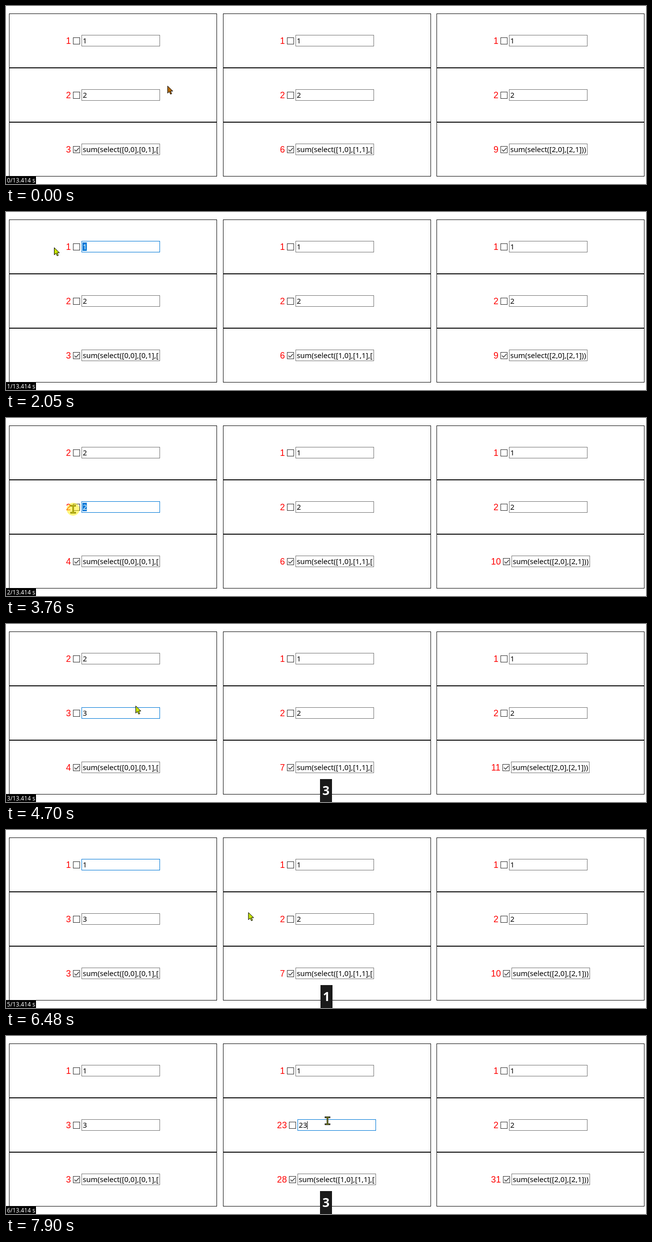
An HTML page that plays this animation: 1280 px wide and 357 px high, repeating every 8 s.

```html
<!DOCTYPE html>
<html lang="en">
<head>
<meta charset="utf-8">
<title>Linked cells</title>
<style>
  html, body { margin: 0; width: 100%; height: 100%; overflow: hidden; background: #fff; }
  svg { display: block; width: 100%; height: 100%; }
  text { white-space: pre; }
  .result { font: 17.6px "Liberation Sans", sans-serif; fill: #f00; text-anchor: end; }
  .input { font: 14.67px "Noto Sans", sans-serif; }
  .clock { font: 11.7px "Noto Sans", sans-serif; fill: #fff; }
  .key { font: bold 25px "Noto Sans", sans-serif; fill: #fff; text-anchor: middle; }
</style>
</head>
<body>
<svg id="stage" viewBox="0 0 1280 357"></svg>
<script>
const LOOP = 8000, SECOND = 1286, KEY_LIFE = 1300;
const COLUMN = 427.5, ROW = 109, DIGIT = 8.39;
const stage = document.getElementById("stage");

// Each edit: press in a field, drag over its text, release, then type keys.
const edits = [
  { col: 0, row: 0, down: 1200, up: 1620, keys: [[2350, "2"]] },
  { col: 0, row: 1, down: 3540, up: 3920, keys: [[4100, "3"]] },
  { col: 0, row: 0, down: 5240, up: 5760, keys: [[5800, "1"]] },
  { col: 1, row: 1, down: 6860, up: 7270, keys: [[7500, "2"], [7740, "3"]] }
];
const keyPresses = edits.flatMap(edit => edit.keys);

// Pointer path: time, x, y
const path = [
  [0, 323, 160], [250, 245, 150], [450, 207, 128], [620, 196, 90], [820, 178, 69],
  [1200, 178, 69], [1600, 96, 71], [2100, 96, 71], [2350, 130, 80], [2600, 200, 92],
  [2830, 238, 97], [3150, 245, 140], [3400, 235, 178], [3540, 235, 179], [3880, 80, 185],
  [4120, 80, 185], [4330, 155, 185], [4700, 259, 164], [4900, 258, 130], [5120, 230, 86],
  [5240, 200, 70], [5600, 96, 71], [5900, 96, 71], [6180, 290, 130], [6480, 484, 165],
  [6770, 600, 180], [6860, 600, 180], [7250, 470, 184], [7450, 470, 184], [7880, 643, 170]
];

function pointerAt(t) {
  const next = path.findIndex(p => p[0] > t);
  if (next < 0) return path[path.length - 1].slice(1);
  const [t0, x0, y0] = path[next - 1], [t1, x1, y1] = path[next];
  const k = (t - t0) / (t1 - t0);
  return [x0 + (x1 - x0) * k, y0 + (y1 - y0) * k];
}

const rect = (x, y, w, h, attrs) =>
  `<rect x="${x}" y="${y}" width="${w}" height="${h}" ${attrs}/>`;
const label = (x, y, kind, content, attrs = "") =>
  `<text x="${x}" y="${y}" class="${kind}" ${attrs}>${content}</text>`;
const outline = color => `fill="none" stroke="${color}"`;

function valuesAt(t) {
  const values = [["1", "1", "1"], ["2", "2", "2"]];
  for (const { row, col, keys } of edits) {
    const typed = keys.filter(([time]) => time <= t).map(([, key]) => key).join("");
    if (typed) values[row][col] = typed;
  }
  return values;
}

const formulas = ["sum(select([0,0],[0,1],[", "sum(select([1,0],[1,1],[", "sum(select([2,0],[2,1]))"];

// The content of a cell is centred, so a longer result moves it aside.
function contentShift(col, result) {
  const extra = result.length < 2 ? 0 : result === "11" ? 8.5 : 9.79;
  return Math.round(COLUMN * col + extra / 2);
}

function cell(t, col, row, result, content, edit, [px, py]) {
  const shift = contentShift(col, result), top = row * ROW;
  const x = px - shift, y = py - top;
  const hover = x > 151 && x < 308 && y > 58 && y < 81;
  const focused = edit && edit.col === col && edit.row === row;
  let selection = "", caret = "", ink = "#000";
  if (focused) {
    const typed = edit.keys.filter(([time]) => time <= t).pop();
    if (typed) {
      if ((t - typed[0]) % 800 < 400)
        caret = rect(153.5 + DIGIT * content.length, 62, 1, 16, "");
    } else if (x < 155) {
      selection = rect(153, 61, 8.6, 17, 'fill="#0078d7"');
      ink = "#fff";
    }
  }
  const border = focused ? "#0078d7" : hover ? "#000" : "#767676";
  const check = row === 2
    ? `<path d="M137 70l3 3.2 6-6.5" ${outline("#333")} stroke-width="1.3"/>` : "";
  const html = rect(Math.round(COLUMN * col) + 6.5, top + 15.5, 415, 108, outline("#111")) +
    `<g transform="translate(${shift} ${top})">` +
    label(129.7, 76, "result", result) +
    rect(134.5, 63.5, 13, 13, outline("#333")) + check +
    rect(151.5, 58.5, 156, 22, outline(border)) + selection +
    label(153.5, 75.3, "input", content, `fill="${ink}"`) + caret + "</g>";
  return { html, hover };
}

function cursor(t, [x, y], overText, pressed) {
  const bar = "M-4-7H4M0-7V7M-4 7H4";
  const warm = Math.max(0, 1 - t / 300);
  const arrowFill = `rgb(${200 - 20 * warm},${230 - 125 * warm},0)`;
  const shape = overText || pressed
    ? `<path d="${bar}" stroke="#000" stroke-width="3" stroke-linecap="square"/>
       <path d="${bar}" stroke="#98a61c" stroke-width="1.2"/>`
    : `<path d="M.5.5V15L4 11.8 6.3 17 8.7 16 6.4 10.8H11Z" fill="${arrowFill}" stroke="#000"/>`;
  const halo = pressed ? '<circle r="13" fill="#fff000" opacity=".5"/>' : "";
  return `<g transform="translate(${x} ${y})">${shape}${halo}</g>`;
}

function keyDisplay(t) {
  const press = keyPresses.filter(([time]) => time <= t).pop();
  if (!press || t - press[0] > KEY_LIFE) return "";
  const age = t - press[0];
  const opacity = Math.min(1, age / 80, (KEY_LIFE - age) / 80);
  const left = press[1] === "3" ? 628 : 629;
  return `<g opacity="${opacity}">` + rect(left, 311, 24, 46, 'fill="#1a1a1a"') +
    label(left + 12, 343, "key", press[1]) + "</g>";
}

function draw(t) {
  const pointer = pointerAt(t);
  const edit = edits.filter(e => e.down <= t).pop();
  const pressed = edit && t < edit.up;
  const values = valuesAt(t);
  const sums = values.map(row => row.reduce((sum, v) => sum + Number(v), 0));
  const totals = [...sums, sums[0] + sums[1]].map(String);

  let html = "", overText = false;
  for (let row = 0; row < 3; row++) {
    for (let col = 0; col < 3; col++) {
      const result = row < 2 ? values[row][col] : totals[col];
      const content = row < 2 ? result : formulas[col];
      const drawn = cell(t, col, row, result, content, edit, pointer);
      html += drawn.html;
      overText = overText || drawn.hover;
    }
  }
  html += rect(0, 341, 60, 16, "") +
    label(2, 353.5, "clock", `${Math.floor(t / SECOND)}/13.414 s`) +
    keyDisplay(t) + cursor(t, pointer, overText, pressed);
  stage.innerHTML = html;
}

const start = performance.now();
function tick() {
  draw((performance.now() - start) % LOOP);
  requestAnimationFrame(tick);
}
tick();
</script>
</body>
</html>
```
